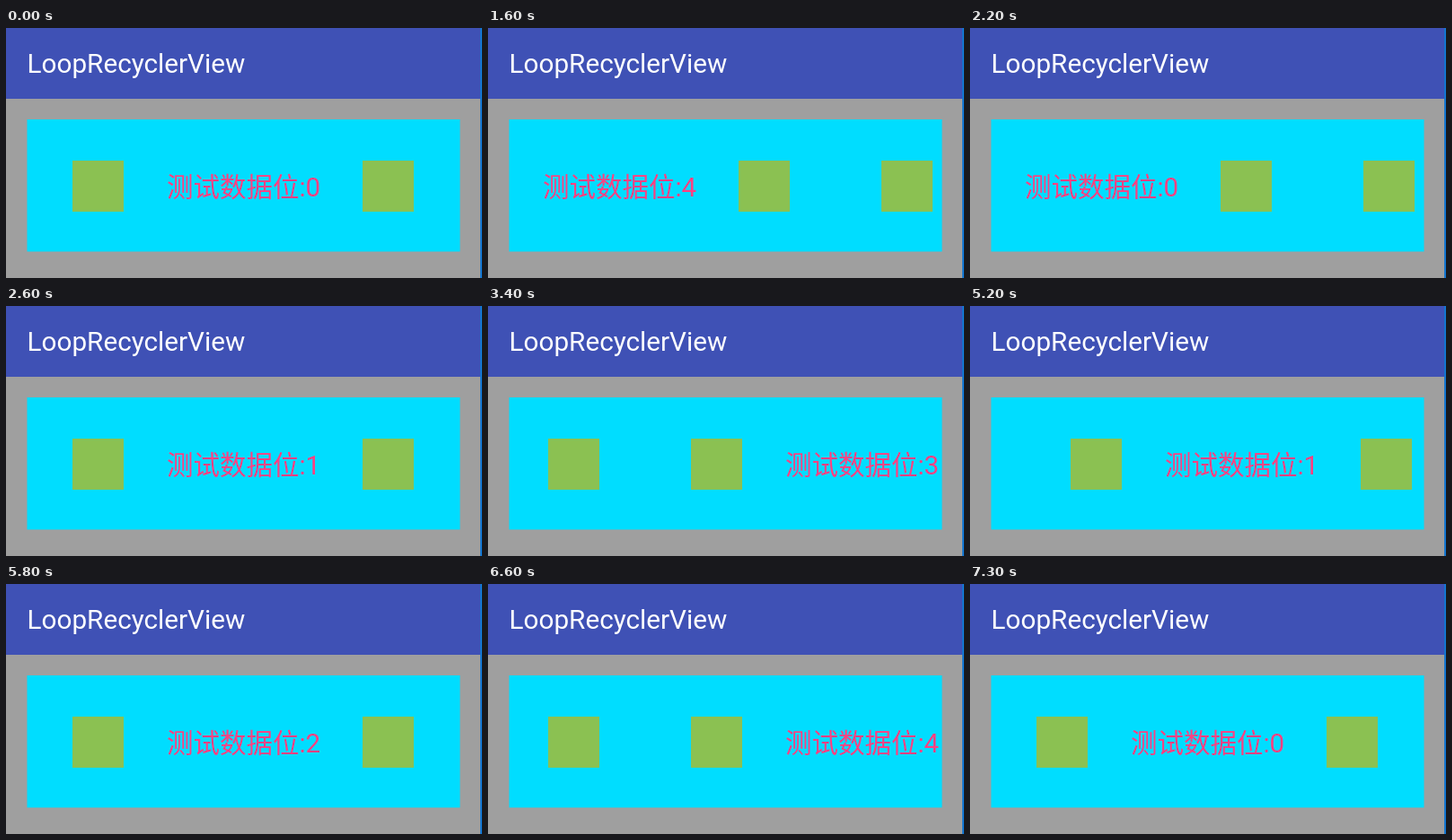
These frames come from a looping animation (530 px wide and 279 px high, 8.2 s). An HTML page with a canvas:

```html
<!DOCTYPE html>
<html lang="zh">
<head>
<meta charset="utf-8">
<title>LoopRecyclerView</title>
<style>
  html, body { margin: 0; width: 100%; height: 100%; overflow: hidden; }
  canvas { display: block; }
</style>
</head>
<body>
<canvas id="stage" width="530" height="279"></canvas>
<script>
const ctx = document.getElementById('stage').getContext('2d');
const LOOP = 8200, STEP = 100, PAGES = 5;
const PAGE_WIDTH = 482, PAGE_LEFT = 24;

// Evenly spaced runs of swipes; each swipe follows the finger, then snaps.
const slow = { duration: 400, drag: 118, direction: 1 };
const quick = { duration: 300, drag: 49, direction: 1 };
const back = { duration: 100, drag: 322, direction: -1 };

const run = (style, firstEnd, count, gap) =>
  Array.from({ length: count }, (_, i) => ({ ...style, end: firstEnd + i * gap }));

const swipes = [
  ...run(back, 900, 1, 0),
  ...run(slow, 2000, 2, 600),
  ...run(quick, 3100, 3, 500),
  ...run(quick, 4800, 6, 500)
];

function travel(t, { end, duration, drag }) {
  const remaining = end - t;
  if (remaining > duration) return 0;
  if (remaining <= 0) return PAGE_WIDTH;
  if (remaining > duration - STEP) return drag;
  return PAGE_WIDTH - 38 * (remaining / STEP) ** 2;
}

const scrollAt = t =>
  swipes.reduce((sum, swipe) => sum + swipe.direction * travel(t, swipe), 0);

function rect(x, y, w, h, color) {
  ctx.fillStyle = color;
  ctx.fillRect(x, y, w, h);
}

function text(string, x, y, size, color, align) {
  ctx.font = `${size}px Roboto, "Noto Sans CJK SC", "Noto Sans CJK", sans-serif`;
  ctx.textAlign = align;
  ctx.fillStyle = color;
  ctx.fillText(string, x, y);
}

function drawPage(index, x) {
  const label = (index % PAGES + PAGES) % PAGES;
  for (const iconX of [50, 373]) rect(x + iconX, 148, 57, 57, '#8bc152');
  text('测试数据位:' + label, x + 240.5, 188, 29.5, '#ff4081', 'center');
}

function draw(t) {
  rect(0, 0, 530, 279, '#9f9f9f');
  rect(0, 0, 530, 79, '#3f51b5');
  rect(528, 0, 2, 279, '#1476d0');
  text('LoopRecyclerView', 23.6, 49.5, 29.7, '#fff', 'left');

  ctx.save();
  ctx.beginPath();
  ctx.rect(23.5, 102, PAGE_WIDTH, 147.5);
  ctx.clip();
  rect(0, 0, 530, 279, '#00ddff');
  const scroll = scrollAt(t);
  const first = Math.floor(scroll / PAGE_WIDTH);
  for (const page of [first, first + 1]) {
    drawPage(page, PAGE_LEFT + page * PAGE_WIDTH - scroll);
  }
  ctx.restore();
}

function tick() {
  const t = performance.now() % LOOP;
  draw(Math.floor(t / STEP) * STEP);
  requestAnimationFrame(tick);
}
tick();
</script>
</body>
</html>
```
